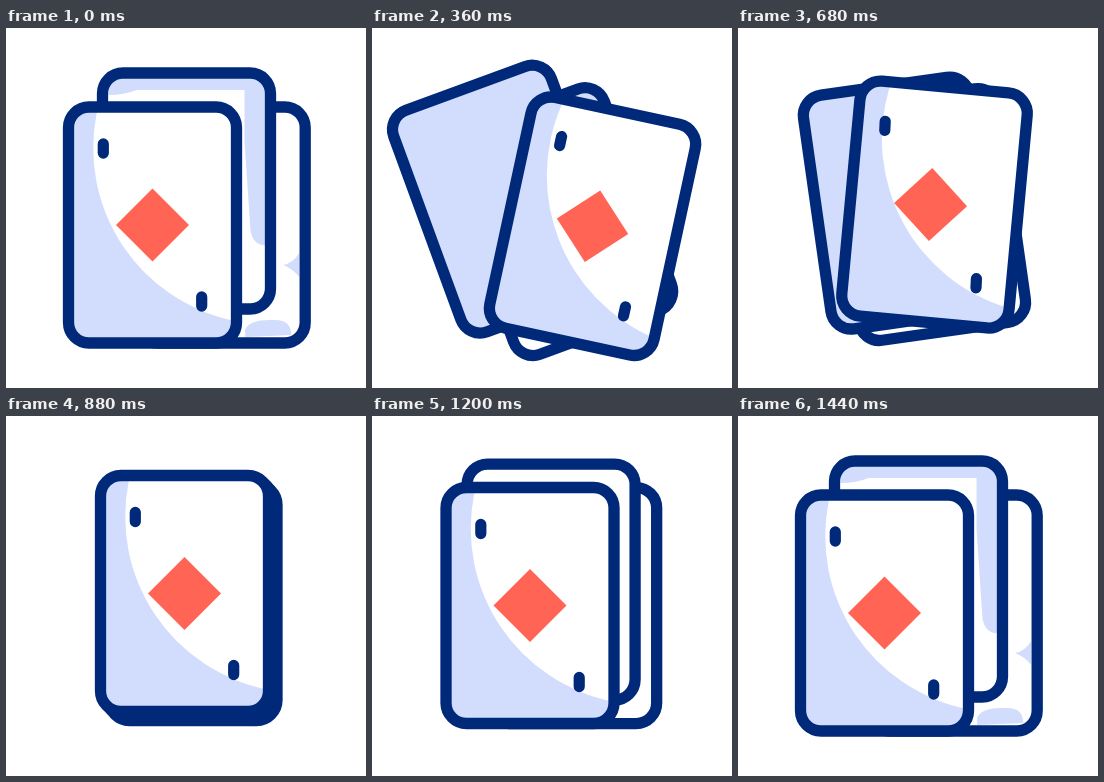
These frames come from a looping animation (360 px wide and 360 px high, 1480 ms). An HTML page with a canvas:

```html
<!DOCTYPE html>
<html lang="en">
<head>
<meta charset="utf-8">
<title>Shuffling cards</title>
<style>
  html, body { margin: 0; width: 100%; height: 100%; overflow: hidden; background: #fff; }
  canvas { display: block; width: 100%; height: 100%; }
</style>
</head>
<body>
<canvas width="360" height="360"></canvas>
<script>
const LOOP = 1480, STEP = 40;
const NAVY = '#00297a', SHADE = '#d2dcfc', RED = '#ff6454';
const canvas = document.querySelector('canvas');
const ctx = canvas.getContext('2d');

const fanEase = u => u < 0.5 ? 4 * u ** 3 : 1 - 4 * (1 - u) ** 3;
const outEase = power => u => 1 - (1 - u) ** power;
const phases = [
  { start: 0, end: 460, ease: fanEase },
  { start: 490, end: 880, ease: outEase(1.3) },
  { start: 1040, end: 1440, ease: outEase(2) },
];

// Poses are [x, y, degrees]: spread, fanned, stacked. Bends curve the way between them.
const frontPoses = [[146.5, 197, 0], [223.7, 198.5, 12.7], [178.5, 177.5, 0]];
const front = {
  poses: frontPoses,
  bends: [[0, -5, 0], [-4, -40, 0], [0, -2, 0]],
};
const face = {
  poses: frontPoses,
  bends: [[0, -5, 0], [-20, -40, -11], [0, -2, 0]],
};
const middle = {
  poses: [[180.5, 163, 0], [132.2, 172.4, -21], [183, 182, 0]],
  bends: [[0, -22, 0], [3, -12, 3], [-10, -16.5, 0]],
};
const back = {
  poses: [[215.2, 197, 0], [186.6, 193.5, -21], [187, 186.5, 0]],
  bends: [[-20, 0, 0], [15, -12, 3], [-19, -16, 0]],
};

// Shaded areas in card coordinates, each valid from its start time.
const full = 'M-90-124H90V124H-90Z';
const middleSpread = 'M-50-101Q-62-96-78-96V-124H90V52Q68 60 64 40L58-50V-101Z';
const middleShades = [
  [0, middleSpread],
  [120, 'M-62-106Q-40-98-20-106Q10-84 30-92Q60-96 90-84V-124H-60Z'],
  [280, full],
  [1080, ''],
  [1320, middleSpread],
];
const backSpread = 'M62 40Q72 38 78 28V52Q72 44 62 40ZM24 104Q30 94 52 95Q70 94 70 110L24 112Z';
const backShades = [
  [0, backSpread],
  [120, 'M50 42Q66 36 90 26V124H40Z'],
  [280, 'M-90-124H90V0H-90Z'],
  [600, ''],
  [1320, backSpread],
];

const latest = (list, startOf, t) => list.filter(item => startOf(item) <= t).pop();

function poseAt(part, t) {
  const phase = latest(phases, p => p.start, t);
  const i = phases.indexOf(phase);
  const p = phase.ease(Math.min(1, (t - phase.start) / (phase.end - phase.start)));
  const from = part.poses[i], to = part.poses[(i + 1) % 3];
  return from.map((v, k) => v + (to[k] - v) * p + part.bends[i][k] * p * (1 - p));
}

function place(part, t, draw) {
  const [x, y, angle] = poseAt(part, t);
  ctx.save();
  ctx.translate(x, y);
  ctx.rotate(angle * Math.PI / 180);
  draw();
  ctx.restore();
}

function fillPath(path, color) {
  ctx.fillStyle = color;
  ctx.fill(path);
}

const outline = new Path2D();
outline.roundRect(-84, -118, 168, 236, 20.5);

function drawCard(base, path, color) {
  fillPath(outline, base);
  ctx.save();
  ctx.clip(outline);
  fillPath(path, color);
  ctx.restore();
  ctx.strokeStyle = NAVY;
  ctx.lineWidth = 11.3;
  ctx.stroke(outline);
}

const glow = new Path2D();
glow.arc(117, -77, 176.3, 0, 7);
const diamond = new Path2D('M0-36.5L36.5 0L0 36.5L-36.5 0Z');
const pips = new Path2D();
for (const side of [-1, 1]) pips.roundRect(side * 49.2 - 5.6, side * 76.5 - 10.2, 11.2, 20.4, 5.6);

function drawFace() {
  fillPath(diamond, RED);
  fillPath(pips, NAVY);
}

function drawBackCard(part, shades, t) {
  const path = new Path2D(latest(shades, s => s[0], t)[1]);
  place(part, t, () => drawCard('#fff', path, SHADE));
}

function render(now) {
  const t = Math.floor((now % LOOP) / STEP) * STEP;
  ctx.fillStyle = '#fff';
  ctx.fillRect(0, 0, 360, 360);
  drawBackCard(back, backShades, t);
  drawBackCard(middle, middleShades, t);
  place(front, t, () => drawCard(SHADE, glow, '#fff'));
  place(face, t, drawFace);
}

let origin;
function tick(now) {
  origin ??= now;
  render(now - origin);
  requestAnimationFrame(tick);
}
render(0);
requestAnimationFrame(tick);
</script>
</body>
</html>
```
